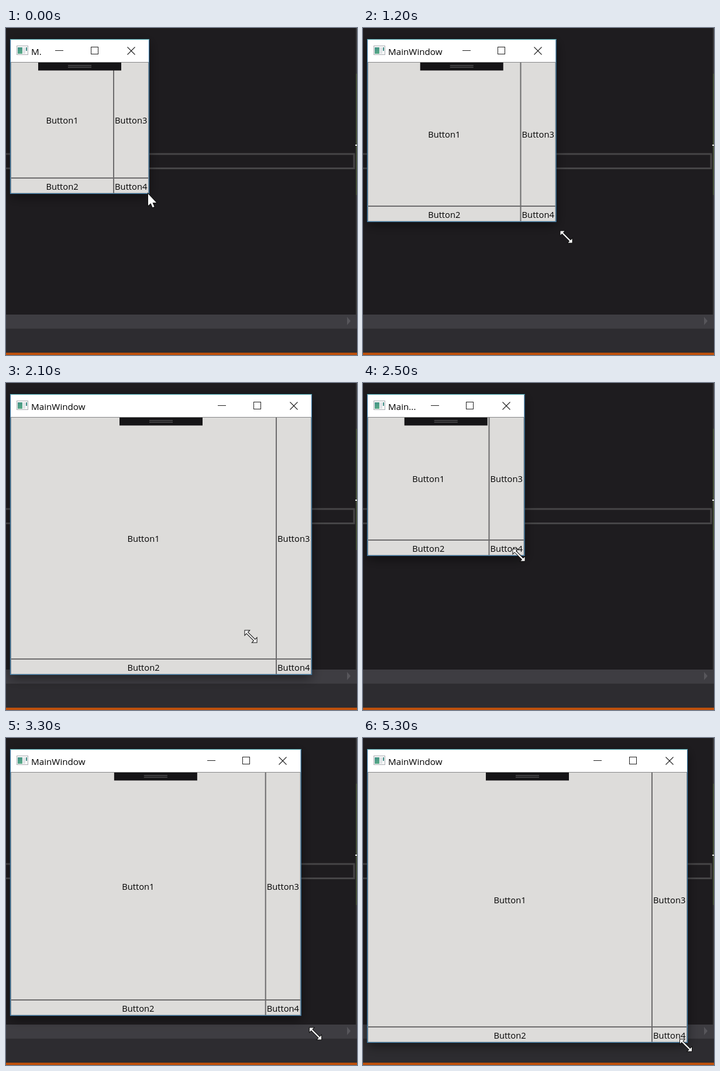
Animation of 600 by 558 pixels, one loop 5400 ms. Source, as an HTML page with a canvas:

```html
<!DOCTYPE html>
<html lang="en">
<head>
<meta charset="utf-8">
<title>Resizing window</title>
<style>
  html, body { margin: 0; width: 100%; height: 100%; overflow: hidden; background: #1e1c1f; }
  canvas { display: block; }
</style>
</head>
<body>
<canvas id="stage" width="600" height="558"></canvas>
<script>
const ctx = document.getElementById('stage').getContext('2d');
const LOOP = 5400, STEP = 100, GRAB_TIME = 400, LAG = 200;
const LEFT = 8, TOP = 20, CLIENT_TOP = 59;
const FONT = '"Open Sans", "Noto Sans", sans-serif';

// Waypoints of the drag: time, x, y
const dragPath = [
  [600, 242, 287.5], [1000, 327.5, 335.5], [1200, 347.5, 356.5],
  [1600, 520, 502.5], [1900, 520, 502.5], [2100, 418.5, 432.5], [2300, 273.5, 299.5],
  [2600, 263, 291], [3100, 501.7, 478.5], [3300, 529, 504.5], [3700, 552, 524.5],
];
const arrow = new Path2D('M0 0v20l4.5-4 3 7 3-1-3-7h6.5z');
const resize = new Path2D('M-10-10h7l-2.7 2.7 13 13L10 3v7h-7l2.7-2.7-13-13L-10-3z');

function pointerAt(t) {
  const next = dragPath.findIndex(key => key[0] > t);
  if (next <= 0) return dragPath.at(next).slice(1);
  const [t0, x0, y0] = dragPath[next - 1], [t1, x1, y1] = dragPath[next];
  const p = (t - t0) / (t1 - t0);
  return [x0 + (x1 - x0) * p, y0 + (y1 - y0) * p];
}

function box(color, x, y, w, h) {
  ctx.fillStyle = color;
  ctx.fillRect(x, y, w, h);
}

function outline(color, x, y, w, h, width = 1) {
  ctx.strokeStyle = color;
  ctx.lineWidth = width;
  ctx.strokeRect(x, y, w, h);
}

function line(color, x1, y1, x2, y2, width = 1) {
  ctx.strokeStyle = color;
  ctx.lineWidth = width;
  ctx.beginPath();
  ctx.moveTo(x1, y1);
  ctx.lineTo(x2, y2);
  ctx.stroke();
}

function drawPointer(path, x, y) {
  ctx.save();
  ctx.translate(x, y);
  ctx.lineWidth = 2;
  ctx.strokeStyle = '#111';
  ctx.stroke(path);
  ctx.fillStyle = '#fff';
  ctx.fill(path);
  ctx.restore();
}

function label(text, x, y, size = 14.7, align = 'center') {
  ctx.font = `${size}px ${FONT}`;
  ctx.textAlign = align;
  ctx.fillStyle = '#000';
  ctx.fillText(text, x, y);
}

function drawEditor() {
  box('#1e1c1f', 0, 0, 600, 558);
  box('#3b3a3c', 598, 0, 2, 489);
  box('#46513a', 598, 78, 2, 207);
  box('#e8e8e8', 597, 199, 3, 2);
  outline('#464547', -5, 215, 600, 24.5, 3);
  box('#3e3d42', 0, 489, 600, 24);
  box('#2d2c30', 0, 513, 600, 41);
  box('#bd500c', 0, 554, 600, 4);
  ctx.fillStyle = '#57565b';
  ctx.fill(new Path2D('M583 493l6 7-6 7z'));
}

// Shortens with an ellipsis, then drops dots that still do not fit
function fitTitle(title, width) {
  ctx.font = `15.2px ${FONT}`;
  const fits = s => ctx.measureText(s).width <= width;
  if (fits(title)) return title;
  let n = title.length - 1;
  while (n > 1 && !fits(title.slice(0, n) + '...')) n--;
  let text = title.slice(0, n) + '...';
  while (text.length > 2 && !fits(text)) text = text.slice(0, -1);
  return text;
}

function drawTitleBar(right) {
  box('#fff', LEFT, TOP, right - LEFT, CLIENT_TOP - TOP);
  box('#fafafa', 18, 30, 20, 16);
  outline('#a9adb2', 18.5, 30.5, 19, 15);
  const teal = ctx.createLinearGradient(20, 33, 28, 44);
  teal.addColorStop(0, '#3f8f86');
  teal.addColorStop(1, '#5fae88');
  box(teal, 20, 33, 8, 11);
  box('#dfe3e6', 29, 33, 4, 11);
  box('#3d8a84', 34, 33, 2, 6);
  label(fitTitle('MainWindow', right - 226), 43, 45.5, 15.2, 'left');

  const [min, max, close] = [153, 92.5, 30.5].map(d => Math.round(right - d));
  line('#222', min - 7, 38.5, min + 7, 38.5);
  outline('#222', max - 6.5, 32.5, 12, 12);
  for (const side of [-6.5, 6.5]) line('#222', close - side, 32.5, close + side, 45.5, 1.1);
}

function drawWindow(right, bottom) {
  const width = right - LEFT, height = bottom - TOP;
  ctx.save();
  ctx.shadowColor = 'rgba(0, 0, 0, 0.5)';
  ctx.shadowBlur = 18;
  ctx.shadowOffsetY = 5;
  box('#dddcda', LEFT, TOP, width, height);
  ctx.restore();

  drawTitleBar(right);

  const column = right - 61, row = bottom - 27.5;
  box('#6d6c6d', column, CLIENT_TOP, 2, bottom - CLIENT_TOP);
  box('#6d6c6d', LEFT, row, width, 2);
  outline('#858687', LEFT + .5, CLIENT_TOP - .5, width - 1, bottom - CLIENT_TOP);

  [(LEFT + column + 1) / 2, right - 30.3].forEach((x, i) => {
    label(`Button${2 * i + 1}`, x, (CLIENT_TOP + row) / 2 + 6);
    label(`Button${2 * i + 2}`, x, bottom - 7);
  });

  const middle = (LEFT + right) / 2;
  box('#161517', middle - 71, CLIENT_TOP, 142, 13.5);
  for (const y of [63.5, 66.5]) box('#6b6a6c', middle - 20, y, 40, 1);

  outline('#3f7fac', LEFT - .5, TOP - .5, width + 1, height + .5, 1.2);
  line('#5fb9bd', LEFT - 1, TOP - .5, right + 1, TOP - .5);
}

function draw(t) {
  drawEditor();
  const [x, y] = pointerAt(t - LAG);
  drawWindow(x + 2, y - 5);
  if (t < GRAB_TIME) drawPointer(arrow, 243, 283);
  else drawPointer(resize, ...pointerAt(t));
}

const start = performance.now();
function tick() {
  const t = (performance.now() - start) % LOOP;
  draw(Math.floor(t / STEP) * STEP);
  requestAnimationFrame(tick);
}
tick();
</script>
</body>
</html>
```
